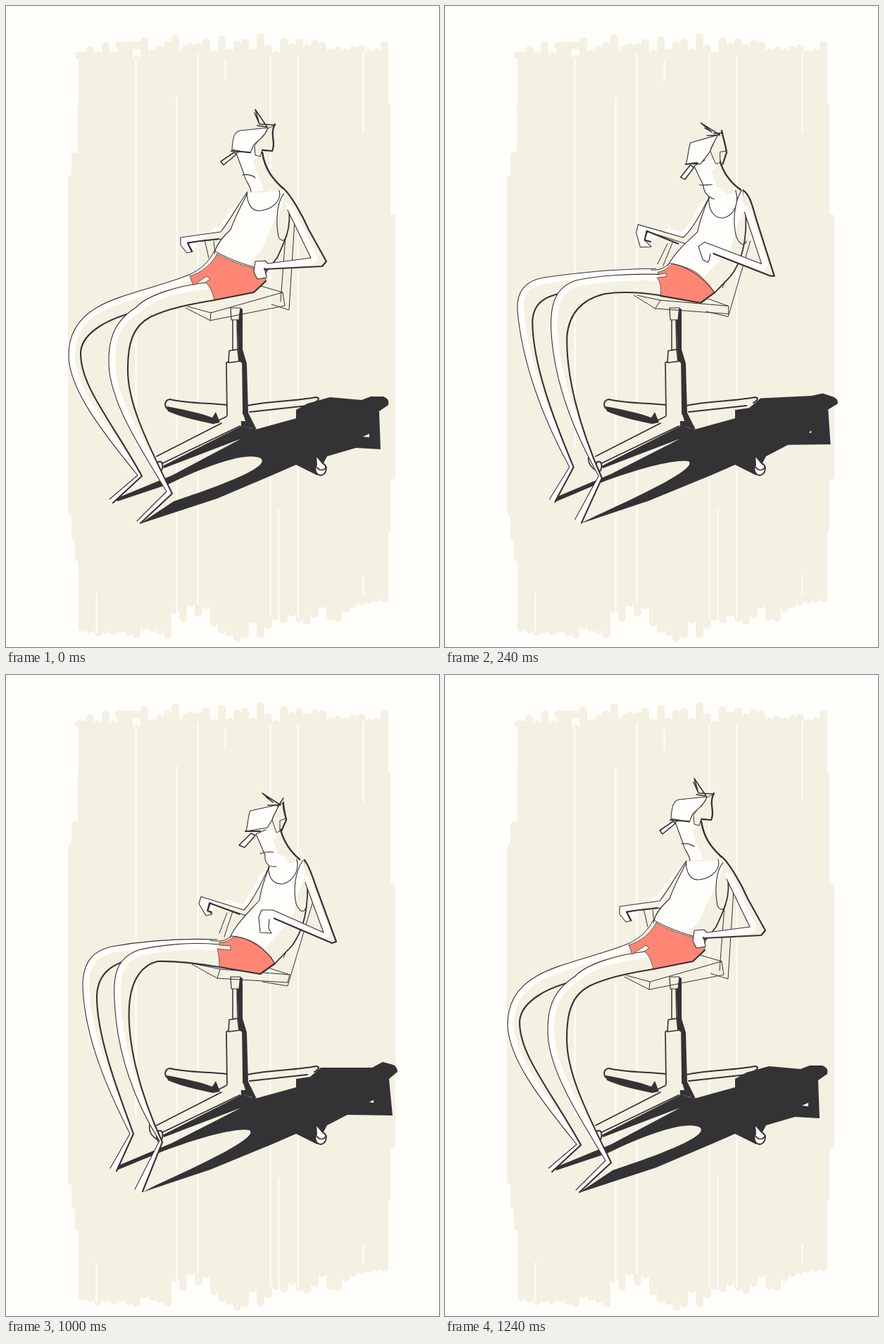
Animation, 615 px wide and 911 px high, one loop 1.32 s. Source, as an HTML page with a canvas:

```html
<!DOCTYPE html>
<html lang="en">
<head>
<meta charset="utf-8">
<title>Slouching on an office chair</title>
<style>
html, body { margin: 0; width: 100%; height: 100%; overflow: hidden; background: #fffefa; }
canvas { display: block; }
</style>
</head>
<body>
<canvas id="stage" width="615" height="911"></canvas>
<script>
const ctx = document.getElementById('stage').getContext('2d');
const PAPER = '#fffefa', SAND = '#f4f0e2', INK = '#333335', CORAL = '#ff8674';

// Every pose has the same path structure, so any two can be blended.
const slumped = {
  shadow: ['190 736 L300 700', '497 628 L532 630 L530 576 L543 567 Q545 558 536 555 L518 555 L505 560 L460 556 L428 565', '236 667 L156 700 L158 704 L230 680 C290 650 345 633 362 643 C372 652 340 670 238 704'],
  spot: 'M507 612 L516 608 L516 613 Z',
  chair: 'M410 305 L402 432 L377 424 M398 315 L390 420 M255 429 L290 447 L396 426 L393 407 L362 398 M258 427 L291 436 L393 407 M291 436 L290 447 M282 332 L288 358 M295 334 L297 352',
  farArm: ['M318 330 L268 335 L258 336 L265 349 L257 351 L248 340 L248 329 L305 321 C320 302 332 278 343 264', '264 349 L258 337 L268 335 L302 331'],
  torso: ['M343 266 C335 282 325 300 319 318 C306 330 298 340 296 352', '369 378 L385 358 C398 330 410 310 397 263'],
  collar: 'M342 266 C343 282 349 292 361 291 C380 289 392 275 388 262 M397 265 C384 275 383 308 387 328 C392 336 396 334 399 326',
  farLeg: ['M260 382 C215 400 160 410 130 428 C100 445 88 470 89 500 C92 545 130 597 187 667 L147 701', '152 706 L193 668 C150 590 105 540 106 492 C108 465 145 440 205 431 L266 400'],
  nearLeg: ['M285 393 C240 398 200 412 185 428 C150 450 145 480 146 510 C148 560 185 620 228 690 L186 732', '191 735 L236 693 C195 610 172 560 173 515 C173 480 180 455 205 442 C230 430 260 424 296 418'],
  shorts: 'M300 352 C322 365 350 373 370 377 L368 392 L352 407 L296 418 C293 405 289 397 283 393 L290 388 L285 384 L266 397 L261 384 C277 379 292 368 300 352 Z',
  waist: 'M260 382 C278 374 289 362 296 348 C320 362 350 371 370 376',
  seam: 'M296 418 L352 407 L369 391',
  head: ['M348 264 C347 254 340 250 338 239 L327 209 L346 202', '364 208 C368 235 382 248 393 259'],
  mouth: 'M336 240 C342 239 350 240 354 244',
  cap: 'M321 204 C322 188 324 178 333 177 L372 173 C368 188 352 194 351 199 L347 209 Z',
  brow: 'M320 206 L346 208',
  nose: 'M324 208 L305 221 L309 226 L327 211 Z',
  hair: 'M372 174 L382 169 C375 182 384 195 378 206 L364 204 L361 214 L354 212 L353 199 Z',
  nape: 'M382 168 C374 182 384 195 378 206 L364 205',
  tuft: 'M357 170 L371 172 L354 147 L360 168 L353 152 M361 168 L382 169',
  arm: ['M367 372 L370 386 L357 388 L352 378 L354 363 L368 362 L372 366 L433 358 L400 290', '393 258 C404 268 420 295 430 318 L455 363 L449 370 L367 374']
};
const rising = {
  shadow: ['195 734 L290 703', '490 628 L544 626 L540 576 L553 567 Q555 560 541 558 L538 553 L522 551 L450 558 L432 570', '236 665 L153 702 L156 706 L220 678 C280 655 330 645 346 647 C354 654 330 672 215 722'],
  spot: 'M517 608 L519 605 L519 608 Z',
  chair: 'M427 318 L404 435 L382 430 M418 322 L396 390 M258 416 L292 433 L406 434 L400 421 L376 410 M262 416 L300 420 L400 421 M300 420 L292 433 M320 338 L312 366 M313 338 L305 363',
  farArm: ['M337 335 L283 321 L276 330 L291 344 L266 344 L262 326 L264 316 L330 326 C345 310 358 285 367 270', '291 344 L277 331 L281 321 L325 335'],
  torso: ['M367 272 C360 288 357 304 346 320 C334 335 322 350 315 366', '380 404 L396 383 C413 360 424 320 417 263'],
  collar: 'M366 270 C366 290 375 299 389 297 C407 294 416 280 411 262 M415 263 C401 280 398 302 403 325 C408 335 413 335 415 328',
  farLeg: ['M302 378 C250 383 190 390 125 398 C108 400 100 410 101 425 C108 505 140 585 181 660 L149 704', '155 706 L188 662 C158 595 126 510 126 445 C126 423 140 420 175 416 L300 400'],
  nearLeg: ['M312 385 C260 386 215 390 190 397 C160 405 152 420 153 455 C157 530 185 605 220 677 L187 728', '197 732 L227 680 C195 600 172 530 175 470 C178 435 205 425 235 417 C260 413 290 411 315 413'],
  shorts: 'M322 364 C335 367 348 370 355 374 L372 392 L381 402 L363 419 L315 412 C317 400 315 392 307 386 L315 381 L311 378 L308 384 L306 380 C312 376 317 370 322 364 Z',
  waist: 'M296 380 C306 377 312 372 316 364 C335 366 355 374 381 403',
  seam: 'M315 413 L363 419 L381 402',
  head: ['M374 272 C364 268 358 262 358 247 L349 222 L365 214', '384 214 C390 235 400 250 414 260'],
  mouth: 'M351 247 C358 249 365 248 371 249',
  cap: 'M340 214 C342 205 342 197 347 190 L386 178 C382 192 372 196 372 201 L367 218 Z',
  brow: 'M338 216 L357 215',
  nose: 'M346 217 L325 235 L330 238 L351 223 Z',
  hair: 'M386 178 L391 176 C390 185 394 195 395 205 L384 205 L386 219 L379 222 L372 201 Z',
  nape: 'M390 174 C391 186 394 195 397 210 L386 220',
  tuft: 'M367 180 L388 179 L362 159 L376 173 L366 165 M378 178 L392 180',
  arm: ['M374 360 L374 368 L358 369 L357 356 L357 341 L375 341 L377 348 L449 361 L414 290', '418 262 C428 275 437 305 445 325 L469 379 L463 378 L376 358']
};
const upright = {
  shadow: ['190 737 L290 703', '485 621 L550 621 L547 572 L561 564 Q562 557 556 553 L535 549 L520 556 L447 557 L432 572', '236 665 L155 698 L157 704 L220 678 C280 655 330 643 346 647 C354 654 330 672 212 727'],
  spot: 'M517 605 L521 602 L521 606 Z',
  chair: 'M438 345 L401 446 L364 437 M430 345 L392 408 M275 408 L303 428 L401 440 L404 430 L372 420 M280 408 L310 417 L404 430 M310 417 L303 428 M326 333 L308 372 M318 338 L300 369',
  farArm: ['M348 341 L291 320 L288 334 L294 341 L285 342 L278 320 L281 307 L344 331 C360 318 372 290 381 272', '293 329 L288 334 L290 319 L336 340'],
  torso: ['M381 272 C372 290 366 305 367 322 C350 335 330 350 318 370', '384 411 L410 387 C434 360 438 315 428 263'],
  collar: 'M381 272 C378 291 388 304 399 304 C413 301 420 280 414 262 M425 262 C417 280 415 310 421 330 C427 344 433 346 437 338',
  farLeg: ['M298 370 C250 367 190 371 150 378 C115 385 103 405 104 435 C110 510 140 590 174 652 L148 699', '157 704 L179 651 C155 590 123 510 123 450 C125 415 150 402 200 396 L290 390'],
  nearLeg: ['M300 379 C260 376 215 379 185 385 C155 395 148 425 149 460 C152 540 185 610 217 662 L183 731', '192 736 L220 665 C185 590 172 520 172 470 C175 430 195 410 220 404 C245 400 270 404 300 410'],
  shorts: 'M323 368 C338 370 352 376 364 386 L376 398 L384 410 L363 424 L300 411 C301 400 300 392 297 386 L315 387 L315 381 L300 380 L300 377 C310 377 317 374 323 368 Z',
  waist: 'M290 372 C305 375 313 372 320 367 C340 368 372 388 384 411',
  seam: 'M300 411 L363 424 L384 411',
  head: ['M388 276 C380 274 374 268 372 258 L357 231 L372 222', '394 222 C399 240 412 254 424 262'],
  mouth: 'M368 259 C374 259 380 258 385 257',
  cap: 'M344 231 C348 220 347 208 350 197 L388 187 C382 198 379 206 380 210 L360 229 Z',
  brow: 'M344 231 L360 228',
  nose: 'M350 232 L341 249 L348 252 L355 234 Z',
  hair: 'M388 187 L396 180 C397 188 400 196 402 207 L395 209 L394 225 L388 226 L380 210 Z',
  nape: 'M395 179 C398 190 402 199 402 207 L400 228',
  tuft: 'M376 187 L392 186 L364 171 L381 183 L371 179 M384 183 L396 181',
  arm: ['M379 347 L376 357 L383 361 L372 363 L362 342 L364 332 L378 333 L450 370 L433 295', '427 262 C436 262 437 272 440 288 L467 387 L461 387 L385 348']
};
const easing = {
  shadow: ['194 735 L290 703', '485 625 L549 626 L544 574 L556 564 Q556 557 550 554 L535 550 L520 558 L447 558 L432 571', '236 665 L155 699 L157 704 L220 678 C280 655 330 643 346 647 C354 654 330 672 213 725'],
  spot: 'M516 607 L522 604 L522 608 Z',
  chair: 'M435 325 L400 442 L364 436 M427 330 L394 402 M264 411 L300 431 L400 437 L403 426 L372 416 M270 411 L304 418 L403 426 M304 418 L300 431 M322 336 L310 372 M314 338 L303 367',
  farArm: ['M344 343 L290 325 L287 335 L293 340 L284 342 L274 325 L277 315 L338 334 C352 320 365 290 374 272', '292 337 L286 335 L289 324 L332 340'],
  torso: ['M374 273 C367 290 362 305 360 320 C345 337 328 352 318 373', '382 410 L406 385 C428 355 433 310 424 263'],
  collar: 'M373 272 C372 288 380 298 393 297 C408 293 417 278 413 262 M422 263 C410 280 408 305 412 325 C417 337 423 339 426 331',
  farLeg: ['M300 376 C250 374 195 378 150 386 C118 393 108 415 109 445 C113 520 145 590 176 652 L148 701', '157 705 L181 652 C158 590 128 510 129 455 C131 420 155 405 205 399 L290 394'],
  nearLeg: ['M302 383 C262 379 215 384 188 391 C158 402 152 425 154 460 C157 540 185 610 218 662 L183 731', '194 734 L222 664 C188 590 172 520 175 470 C178 430 195 412 215 407 C245 406 275 411 303 415'],
  shorts: 'M323 372 C337 372 352 378 364 388 L376 400 L382 410 L361 425 L303 415 C303 404 302 396 300 389 L319 391 L319 385 L303 384 L303 380 C312 380 318 377 323 372 Z',
  waist: 'M290 377 C305 380 313 377 320 371 C340 371 370 388 382 411',
  seam: 'M303 415 L361 425 L382 410',
  head: ['M384 272 C372 274 367 266 368 256 L355 226 L369 220', '390 220 C395 238 405 252 417 262'],
  mouth: 'M361 254 C367 252 374 251 380 252',
  cap: 'M341 222 C344 212 343 202 347 193 L388 184 C383 196 378 202 378 206 L371 217 Z',
  brow: 'M340 222 L361 222',
  nose: 'M348 225 L331 242 L339 245 L354 228 Z',
  hair: 'M388 184 L393 182 C393 190 395 196 397 204 L389 207 L389 222 L384 224 L378 206 Z',
  nape: 'M394 181 C394 190 397 198 398 206 L391 222',
  tuft: 'M372 185 L390 185 L364 168 L379 181 L370 174 M386 187 L394 175',
  arm: ['M374 347 L373 360 L377 367 L361 366 L359 344 L363 334 L379 334 L451 366 L425 295', '424 263 C430 270 435 285 440 300 L469 379 L463 381 L381 346']
};
const sinking = {
  shadow: ['193 735 L295 702', '490 628 L542 627 L538 576 L551 567 Q551 560 542 559 L535 553 L514 556 L505 561 L450 558 L432 567', '236 666 L152 702 L156 706 L230 678 C285 653 345 636 360 643 C370 652 340 670 228 712'],
  spot: 'M512 610 L521 606 L521 610 Z',
  chair: 'M412 305 L405 436 L383 428 M404 310 L397 410 M255 425 L289 444 L397 429 L395 408 L368 402 M260 423 L290 430 L395 408 M290 430 L289 444 M289 328 L290 358 M297 331 L298 354',
  farArm: ['M326 325 L276 331 L268 334 L277 346 L264 344 L253 331 L259 321 L324 317 C336 300 343 280 354 265', '277 345 L268 335 L276 330 L316 326'],
  torso: ['M354 266 C342 284 336 300 330 316 C315 330 303 344 303 360', '377 383 L391 363 C405 335 416 310 403 262'],
  collar: 'M352 268 C350 285 360 294 372 292 C392 290 402 275 397 260 M405 263 C391 275 386 305 391 324 C397 333 401 330 403 323',
  farLeg: ['M264 381 C220 396 165 413 120 430 C97 438 88 450 90 470 C97 530 145 590 182 661 L143 703', '151 707 L188 663 C165 590 108 520 108 470 C110 445 145 425 205 416 L270 398'],
  nearLeg: ['M288 392 C240 396 205 408 185 420 C152 440 146 465 147 495 C152 550 190 620 230 677 L189 730', '194 734 L235 680 C200 610 165 550 168 500 C170 470 185 450 215 438 C240 428 265 424 292 418'],
  shorts: 'M307 359 C327 369 355 380 377 383 L369 396 L359 409 L292 418 C293 404 291 397 284 393 L292 386 L287 381 L268 394 L264 384 C280 379 297 371 307 359 Z',
  waist: 'M264 381 C282 375 295 368 303 357 C325 368 355 379 378 382',
  seam: 'M292 418 L359 409 L377 383',
  head: ['M361 266 C357 258 349 252 346 242 L339 212 L357 206', '377 210 C380 235 390 250 402 260'],
  mouth: 'M345 242 C350 235 358 238 362 243',
  cap: 'M330 207 C340 198 332 188 338 180 L381 174 C377 188 364 192 365 199 L357 211 Z',
  brow: 'M329 207 L349 209',
  nose: 'M333 210 L317 221 L321 227 L338 213 Z',
  hair: 'M381 174 L386 174 C382 183 386 194 387 205 L376 202 L380 215 L371 213 L365 199 Z',
  nape: 'M386 174 C381 184 387 196 387 208 L378 215',
  tuft: 'M367 174 L382 178 L363 151 L371 169 L367 163 M375 177 L388 170',
  arm: ['M371 363 L364 369 L370 375 L352 376 L348 360 L352 348 L362 349 L365 352 L444 357 L408 295', '404 260 C413 270 422 295 432 318 L459 368 L453 371 L366 364']
};

function mix(a, b, t) {
  const ends = JSON.stringify(b).match(/\d+(\.\d+)?/g);
  let i = 0;
  return JSON.parse(JSON.stringify(a).replace(/\d+(\.\d+)?/g, n => +n + (ends[i++] - n) * t));
}

const steps = [
  [0, slumped], [80, mix(slumped, rising, 0.5)], [160, rising], [240, mix(rising, upright, 0.6)],
  [320, upright], [1000, easing], [1080, mix(easing, sinking, 0.5)], [1160, sinking], [1240, slumped]
];
const LOOP = 1320;

function fill(d, color) {
  ctx.fillStyle = color;
  ctx.fill(new Path2D(d));
}
function line(d, width = 1.2, color = INK) {
  ctx.strokeStyle = color;
  ctx.lineWidth = width;
  ctx.stroke(new Path2D(d));
}
function shape(d, color, width) {
  fill(d, color);
  line(d, width);
}
// A lit thin edge and a heavy edge enclose one body part.
function limb([thin, heavy], light, weight = 2.1) {
  const body = `${thin} L${heavy} Z`;
  fill(body, SAND);
  ctx.save();
  ctx.clip(new Path2D(body));
  line(thin, light, PAPER);
  ctx.restore();
  line(thin, 1.1);
  line('M' + heavy, weight);
}

const tops = [70,62,70,56,70,57,56,76,50,68,62,56,46,66,58,58,52,68,48,66,55,52,66,44,60,70,50,58,52,60,54,56,66,63,66,62,60,68,66,55];
const bottoms = [884,886,890,886,889,885,890,893,880,884,887,893,858,870,848,862,852,876,886,890,898,893,872,893,880,868,872,862,870,874,864,850,868,870,856,850,846,844,842,842];

function backdrop() {
  fill('M0 0H615V911H0Z', PAPER);
  fill('M107 78H538V840H107Z M102 138H546V745H98V787H107V757H93V722H88V242H93V210H102Z M540 157H546V297H553V672H546V745H538Z', SAND);
  tops.forEach((y, i) => line(`M${107 + i * 11 + 1.5} ${y}V${bottoms[i]}`, 11, SAND));
  line('M103 70H112 M160 56H195 M255 61H274', 10, SAND);
  line('M107 139V200 M98 213V240 M93 245V720 M98 725V754 M103 760V785 M541 161V292 M548 301V668 M541 660V741', 10, SAND);
  line('M184.5 75V625 M242.5 130V862 M272.5 68V850 M375.5 70V868 M414.5 70V870', 2.2, PAPER);
  line('M311.5 78V106 M507.5 66V180 M387.5 716V870 M128.5 835V890 M507.5 810V836', 2.2, PAPER);
}

function shadow(p) {
  const [foot, right, left] = p.shadow;
  fill(`M${foot} L380 666 L412 652 L442 667 L456 640 L${right} L412 574 L412 586 L354 602 L335 596 L303 606 L222 650 L224 657 L334 615 L${left} Z`, INK);
  fill(p.spot, PAPER);
}

function base() {
  fill('M328 434 L336 431 L336 488 L342 508 L344 578 L356 602 L334 596 Z', INK);
  fill('M313 567 L232 560 L229 571 L293 588 L303 594 L316 584 Z', SAND);
  fill('M228 569 C250 573 275 578 293 585 L298 577 L304 592 L294 594 C270 589 245 583 230 576 Z', INK);
  fill('M214 643 L305 593 L334 597 L220 655 Z', SAND);
  line('M314 567 C290 564 255 565 233 559 C225 560 224 569 230 573', 2);
  line('M342 568 C375 561 410 562 440 556 C447 557 444 560 438 564 M346 577 L428 568', 2);
  line('M306 593 L214 640 M332 597 L220 651 M300 590 L314 583 M340 590 L353 602', 1.8);
  shape('M216 648 C225 644 224 662 217 663 C213 660 213 652 216 648 Z', SAND, 2);
  line('M204 639 C202 648 207 656 215 660', 1.6);
  shape('M440 638 L450 650 C458 654 455 666 447 667 C439 666 438 657 441 652 Z', PAPER, 2);
  line('M441 655 C445 661 451 661 455 655', 1.6);
  fill('M313 507 C320 502 330 502 336 507 L337 580 L340 590 L314 590 Z', SAND);
  line('M314 582 L313 507 C320 502 330 502 336 507 L337 580', 1.7);
  shape('M317 490 L329 488 L331 505 L316 507 Z', SAND, 1.6);
  shape('M322 444 L328 444 L329 488 L322 489 Z', SAND, 1.5);
  shape('M319 429 L333 429 L331 446 L320 446 Z', SAND, 1.2);
  line('M334 432 L333 448', 4);
}

function draw(p) {
  backdrop();
  shadow(p);
  base();
  line(p.chair, 1);
  limb(p.farArm, 14, 2);
  limb(p.torso, 104, 1.8);
  limb(p.farLeg, 18);
  limb(p.nearLeg, 18);
  shape(p.shorts, CORAL, 0.7);
  line(p.waist, 1);
  line(p.seam, 2.2);
  limb(p.head, 36, 2.4);
  line(p.collar, 1.1);
  line(p.mouth, 1.1);
  fill(p.hair, SAND);
  line(p.hair, 1);
  line(p.nape, 2.2);
  shape(p.cap, PAPER, 1.1);
  line(p.brow, 1.9);
  shape(p.nose, PAPER, 1.6);
  line(p.tuft, 1.5);
  limb(p.arm, 18, 2.2);
}

ctx.lineCap = ctx.lineJoin = 'round';
const start = performance.now();
let shown;
function tick() {
  const t = (performance.now() - start) % LOOP;
  const pose = steps.filter(s => s[0] <= t).pop()[1];
  if (pose !== shown) draw(shown = pose);
  requestAnimationFrame(tick);
}
tick();
</script>
</body>
</html>
```
